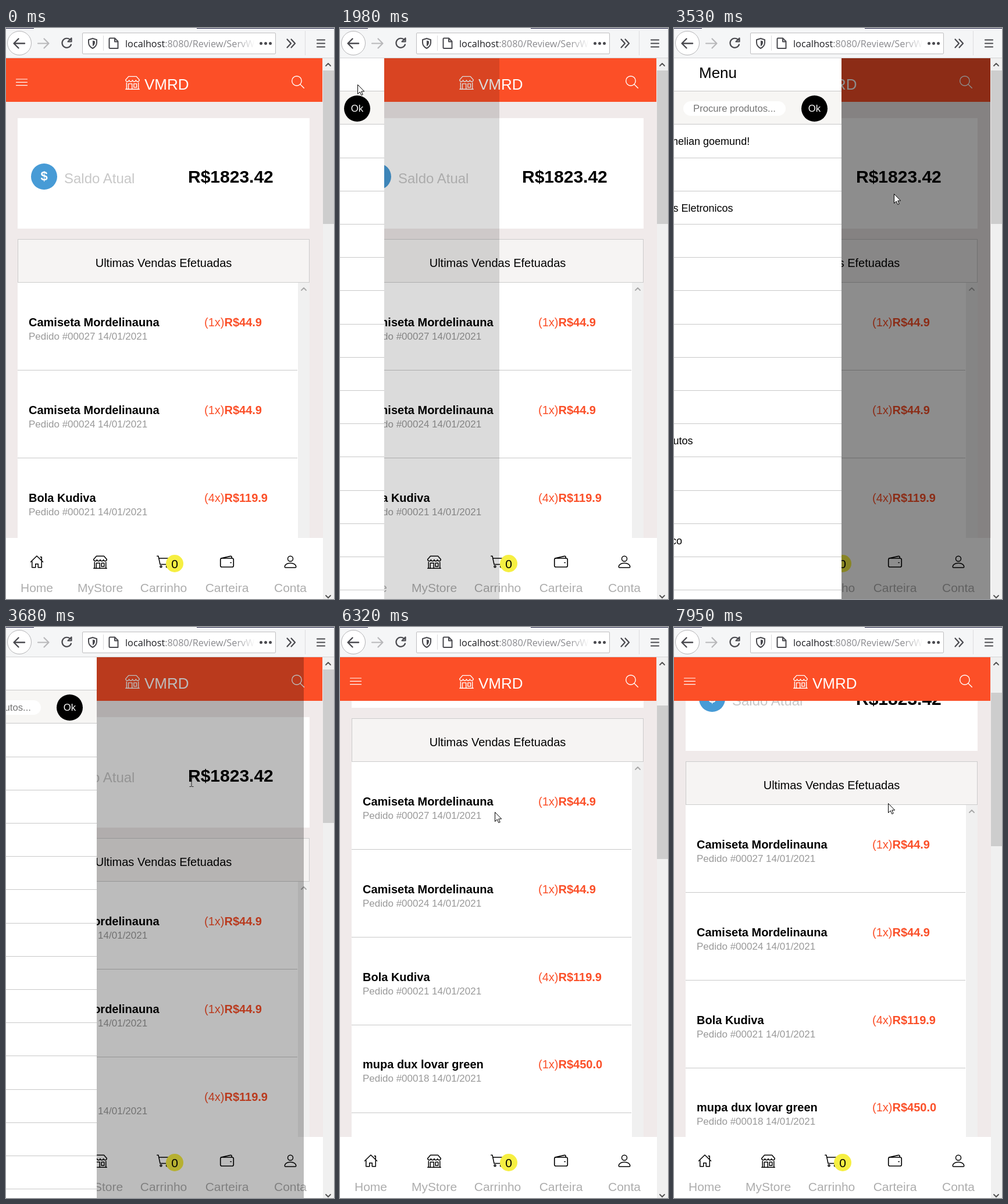
Animation, 564 px wide and 982 px high, one loop 8000 ms. Source, as an HTML page:

```html
<!DOCTYPE html>
<html lang="pt">
<head>
<meta charset="utf-8">
<style>
html, body { margin: 0; width: 100%; height: 100%; overflow: hidden; }
body { position: relative; font-family: "Liberation Sans", Arial, sans-serif; color: #000; }
div, svg { position: absolute; }
svg { overflow: visible; }
.t { white-space: pre; line-height: 30px; height: 30px; }
.line { fill: none; stroke: currentColor; stroke-linejoin: round; stroke-linecap: round; }
#stage { left: 0; top: 0; width: 564px; height: 982px; overflow: hidden; background: #fff; }
#view { left: 0; top: 52px; width: 545px; height: 930px; overflow: hidden; background: #f0eaea; }
#page, #bar, #nav, #shade, #menu { left: 0; top: -52px; }
#bar { top: 0; width: 544px; height: 75px; background: #fc4f27; color: #fff; }
#nav { top: 825px; width: 545px; height: 105px; background: #fff; }
#shade { top: 0; height: 930px; background: #000; }
#menu { top: 0; width: 413px; height: 930px; background: #fff; }
.box { left: 20px; width: 502px; background: #fff; }
.head { box-sizing: border-box; height: 75px; border: 1px solid #ccc; background: #f6f4f3; }
.rule { height: 1px; background: #c8c8c8; }
.sel { background: #0078d7; overflow: hidden; }
.dot { border-radius: 50%; }
#chrome { left: 0; top: 0; width: 564px; height: 52px; background: #f5f6f7; color: #4a4a4f; }
#url { left: 205px; top: 12px; width: 223px; height: 30px; overflow: hidden; font-family: "Open Sans", "Noto Sans", sans-serif;
  -webkit-mask-image: linear-gradient(90deg, #000 85%, transparent); mask-image: linear-gradient(90deg, #000 85%, transparent); }
#track { left: 545px; top: 52px; width: 19px; height: 930px; background: #f0f0f0; color: #505050; }
#thumb { left: 0; width: 19px; height: 264px; background: #cdcdcd; }
#press { width: 30px; height: 30px; background: rgba(246, 238, 50, .72); }
</style>
</head>
<body>
<div id="stage">
  <div id="view">
    <div id="page"></div>
    <div id="bar"></div>
    <div id="nav"></div>
    <div id="shade"></div>
    <div id="menu"></div>
  </div>
  <div id="track"><div id="thumb"></div></div>
  <div id="chrome"></div>
  <div id="press" class="dot"></div>
  <svg id="arrow" width="13" height="20"><path d="M.5.5v16l3.7-3.6 2.6 5.7 2.4-1.1-2.5-5.5h5z" fill="#fff" stroke="#000"/></svg>
  <svg id="beam" width="8" height="16"><path d="M.5.5h3M4.5.5h3M4 1v14M.5 15.5h3M4.5 15.5h3" fill="none" stroke="#222"/></svg>
</div>
<script>
const $ = id => document.getElementById(id);
const add = (id, ...html) => $(id).insertAdjacentHTML('beforeend', html.join(''));
const box = (x, y, w, h, style = '', cls = '', inner = '') =>
  `<div class="${cls}" style="left:${x}px;top:${y}px;width:${w}px;height:${h}px;${style}">${inner}</div>`;
// y is the middle of the capitals
const text = (x, y, size, str, style = '') =>
  `<div class="t" style="left:${x}px;top:${y - 15}px;font-size:${size}px;${style}">${str}</div>`;
const centred = (x, y, size, str, style = '') =>
  text(x - 150, y, size, str, `width:300px;text-align:center;${style}`);
const icon = (x, y, size, unit, body, cls = '', style = '') =>
  `<svg class="${cls}" viewBox="0 0 ${unit} ${unit}" style="left:${x}px;top:${y}px;width:${size}px;height:${size}px;${style}">${body}</svg>`;
const path = (d, attrs = '') => `<path d="${d}" ${attrs}/>`;
const circle = (x, y, r, attrs = '') => `<circle cx="${x}" cy="${y}" r="${r}" ${attrs}/>`;
const bold = 'font-weight:bold;';

const shop = path('M3.7 1.5h8.6l3.2 3.7v.4a1.9 1.9 0 0 1-3.75 0 1.9 1.9 0 0 1-3.75 0 1.9 1.9 0 0 1-3.75 0A1.9 1.9 0 0 1 .5 5.6v-.4zM1.5 8.5v7M14.5 8.5v7M.5 15.5h15M3.5 15V9.5h4V15M9.5 9.5h3v4h-3z');
const lens = circle(6.5, 6.5, 6) + path('M11 11l4.5 4.5');
const chevron = (x, y, up) => icon(x, y, 10, 10, path(up ? 'M1 7l4-4 4 4' : 'M1 3l4 4 4-4'), 'line', 'stroke-width:1.8;');

// Page
const header = (y, str) => box(20, y, 502, 75, '', 'head') + centred(271, y + 41, 20, str);
const sales = [
  ['Camiseta Mordelinauna', 27, 1, '44.9'], ['Camiseta Mordelinauna', 24, 1, '44.9'],
  ['Bola Kudiva', 21, 4, '119.9'], ['mupa dux lovar green', 18, 1, '450.0'], ['mupa dux lovar green', 17, 2, '450.0']
];
const saldo = (x, y, color) => text(x, y, 24, 'Saldo Atual', 'color:' + color);
const total = (x, y, color) => text(x, y, 30, 'R$1823.42', bold + 'color:' + color);
add('page',
  box(20, 155, 502, 190, 'background:#fff'),
  box(43, 233, 45, 45, 'background:#479bd6', 'dot'),
  centred(65.5, 255, 22, '$', bold + 'color:#fff'),
  saldo(100, 259, '#c8c8c8'), total(313, 256, '#000'),
  '<div id="marks">',
  `<div class="sel" id="selA" style="left:204px;top:245px;height:27px">${saldo(-104, 14, '#fff')}</div>`,
  '<div class="sel" id="selB" style="left:275px;top:249px;width:6px;height:22px"></div>',
  `<div class="sel" id="selC" style="left:313px;top:240px;height:33px">${total(0, 16, '#fff')}</div></div>`,
  header(363, 'Ultimas Vendas Efetuadas'),
  box(20, 438, 482, 759, 'background:#fff'),
  box(502, 438, 20, 759, 'background:#f0f0f0;color:#a8a8a8', '', chevron(5, 6, true) + chevron(5, 743)),
  ...sales.map(([name, id, n, price], i) => {
    const y = 506 + Math.round(i * 150.8);
    return text(39, y, 20, name, bold) +
      text(39, y + 25, 17, `Pedido #000${id} 14/01/2021`, 'color:#999') +
      text(341, y, 20, `(${n}x)<b>R$${price}</b>`, 'color:#fb4f28') +
      box(20, 588 + i * 151, 481, 1, '', 'rule');
  }),
  header(1215, 'Ultimas Compras Realizadas'));

add('bar',
  icon(17, 31, 20, 20, path('M.5 5h19M.5 10.3h19M.5 15.7h19'), 'line', 'stroke-width:1.2'),
  icon(205, 29, 25, 16, shop, 'line', 'stroke-width:.9'),
  text(238, 45, 26, 'VMRD'),
  icon(491, 30, 22, 16, lens, 'line'));

// Bottom navigation
const tabs = [
  ['Home', path('M2.5 7.5v7h4v-4h3v4h4v-7M1 8.2l7-6.9 7 6.9M12 2.5h1.5V6')],
  ['MyStore', shop],
  ['Carrinho', path('M.5 1.5H2l2 9.5h9l1.5-7h-12') + circle(5, 13.5, 1) + circle(12, 13.5, 1)],
  ['Carteira', path('M1 4L12 1.6q1.4-.2 1.4 1.1V4M2 4h12a1.5 1.5 0 0 1 1.5 1.5v7A1.5 1.5 0 0 1 14 14H2a1.5 1.5 0 0 1-1.5-1.5v-7A1.5 1.5 0 0 1 2 4zM12 9h.8', 'stroke-width="1.1"')],
  ['Conta', circle(8, 4.5, 3) + path('M1.5 13.8C1.5 11.5 4 9.5 8 9.5s6.5 2 6.5 4.3q0 .9-1 .9h-11q-1 0-1-.9z')]
];
add('nav', ...tabs.map(([label, art], i) =>
  icon(41 + i * 109, 29, 24, 16, art, 'line') +
  centred(53 + i * 109, 86, 21, label, 'color:#adadad')),
  box(275, 29, 30, 30, 'background:#f6ef42', 'dot'),
  centred(290, 44.5, 21, '0'));

// Side menu
const white = 'fill="#fff"';
const stroke = w => `fill="none" stroke="#000" stroke-width="${w}"`;
const items = [
  ['Pesquisa', 18, circle(7.2, 7.2, 5.6, stroke(3)) + path('M11.3 11.3l5.4 5.4', stroke(3.2))],
  ['Bem vindo helian goemund!', 18, circle(9, 9, 8.7) + circle(6, 7, 1.2, white) + circle(12, 7, 1.2, white) + path('M5 11.3q4 4 8 0', 'fill="none" stroke="#fff" stroke-width="1.3"')],
  ['Home', 20.3, path('M.8 9.2l9.3-7.6 9.3 7.6', stroke(1.8)) + path('M3.5 9.7l6.6-5.4 6.6 5.4V16.5h-4.6V12h-4v4.5H3.5zM14 2h2.4v5L14 5z')],
  ['Dispositivos Eletronicos', 22.5, path('M3.4 13V3.5q0-1 1-1h13.7q1 0 1 1V13', stroke(2.2)) + '<rect y="13.6" width="22.5" height="3" rx="1.4"/>'],
  ['Acessorios', 13.5, path('M3 0h2v5H3zM8.5 0h2v5h-2zM.5 5.5H13v2h-1a5.5 5.5 0 0 1-4.2 5.2V18H5.7v-5.3A5.5 5.5 0 0 1 1.5 7.5h-1z')],
  ['Infantil', 13.5, circle(6.75, 2.8, 2.7) + path('M1.2 4.5l3 3.3h5.1l3-3.3', stroke(2.2)) + path('M4 7.5h5.5v4.7H4z') + path('M4.6 12.5L3 14.5l2 2.4M8.9 12.5l1.6 2-2 2.4', stroke(2.2))],
  ['Fashion', 22.5, path('M8 1.2c1.5 1.6 5 1.6 6.5 0l3 .8 5 3.5-2.2 3.9-2.8-1.2v8.4H5V8.2L2.2 9.4 0 5.5 5 2z')],
  ['Esportes', 18, circle(9, 9, 8, stroke(1.7)) + circle(9, 9, 6.6, stroke(3) + ' stroke-dasharray="4.15"') + path('M9 5.5l3.4 2.5-1.3 4H6.9L5.6 8z')],
  ['Livros', 15.8, '<rect width="15.8" height="18" rx="2"/>' + path('M4.5 4.5h7v1.2h-7zM4.5 7.2h7v1.2h-7zM2.7 13.8H14v1.8H2.7z', white)],
  ['Meu Perfil', 15.8, circle(7.9, 4.6, 4.4) + path('M0 18v-3a4.7 4.7 0 0 1 4.7-4.7h6.4a4.7 4.7 0 0 1 4.7 4.7v3z')],
  ['Meus Produtos', 22.5, path('M3.5.5H19L22 7H.5zM2 8h2.5v5h9V8h2v9.5H2zM18 8h2.4v9.5H18z')],
  ['Carrinho', 20.3, path('M0 .7h4L4.5 3H20l-1.8 8H7.2l.4 1.6h10.5v1.8H6L3.2 2.6H0z') + circle(8, 16, 1.8) + circle(16, 16, 1.8)],
  ['Carteira', 18, path('M2.2 1h14v1.8H2.5v1H16a2 2 0 0 1 2 2V15a2 2 0 0 1-2 2H2.2A2.2 2.2 0 0 1 0 14.8v-12A2 2 0 0 1 2.2 1z') + circle(14, 10.3, 1.2, white)],
  ['Fale conosco', 18, path('M17.5 1l-4-1-2 4.5 2.3 2A13 13 0 0 1 7 13.5l-2-2.4L.3 13l1 4C10 17.5 17.8 10 17.5 1z')],
  ['Logout', 22.5, path('M2.5 2.5L11 .3v17.4H0v-2h2.5zM12.3 2.3h6v13.4h3.5v2h-6V4.5h-3.5z') + circle(9, 9, 1, white)]
];
const rowTop = i => Math.round(56.2 + i * 57.2);
add('menu',
  text(168, 25, 26, 'Menu'),
  box(0, 57, 413, 56, 'background:#f7f6f4'),
  ...items.map(([label, w, art], i) =>
    icon(9, rowTop(i) + 20, 18, 18, art) +
    text(9 + w + 5, rowTop(i) + 30, 18, label) +
    box(0, rowTop(i), 413, 1, '', 'rule')),
  box(0, rowTop(15), 413, 1, '', 'rule'),
  box(141, 74, 176, 25, 'background:#fff;border-radius:13px'),
  text(158, 86.5, 16.7, 'Procure produtos...', 'color:#757575'),
  box(344, 64, 45, 45, 'background:#000', 'dot'),
  centred(366.5, 86.5, 16.7, 'Ok', 'color:#fff'));

// Browser toolbar
const tool = (d, style) => icon(0, 0, 564, 564, path(d), 'line', style);
add('chrome',
  box(0, 0, 48, 1, 'background:#15153a'), box(328, 0, 236, 1, 'background:#15153a'),
  box(0, 51, 564, 1, 'background:#d4d4d6'),
  box(2, 5, 40, 40, 'border:1px solid #b4b4b6;background:#fff', 'dot'),
  box(131, 8, 331, 35, 'border:1px solid #bebec0;border-radius:2px;background:#fff'),
  box(167, 13, 1, 26, 'background:#dcdcde'), box(514, 5, 1, 42, 'background:#dcdcde'),
  tool('M32 26.500H14M21.500 18.500l-8 8 8 8', 'stroke-width:2.4'),
  tool('M55 26.500h18M65.500 18.500l8 8-8 8', 'stroke-width:2.2;color:#b8b8ba'),
  tool('M110.500 20.500a8 8 0 1 0 1.500 8M112.500 17.500v6h-6z', 'stroke-width:2.2'),
  tool('M149 18l7 2.300v4.700c0 5-3 8-7 10-4-2-7-5-7-10v-4.700z', 'stroke-width:2'),
  icon(0, 0, 564, 564, path('M149 21.500v10c2.500-1.500 4-3.500 4-6.500v-2.300z', 'fill="#4a4a4f"')),
  tool('M179 17.500h8l5.500 5.500v12H179q-1.500 0-1.500-1.500V19q0-1.500 1.500-1.500zM187 18v5.500h5', 'stroke-width:2'),
  ...[438, 446, 454].map(x => box(x - 2.5, 23.5, 5, 5, 'background:#4a4a4f', 'dot')),
  tool('M483.500 19.500l6.500 7-6.500 7M490.500 19.500l6.500 7-6.500 7', 'stroke-width:2.2'),
  tool('M535 20.500h13M535 26.500h13M535 32.500h13', 'stroke-width:2.2'),
  `<div id="url">${text(0, 15, 16.3, '<span style="color:#1c1c20">localhost</span>:8080/Review/ServWeb', 'color:#8a8a8e')}</div>`);
add('track', chevron(4, 6, true), chevron(4, 921));

// The screen refreshes in bursts: start, end, number of refreshes
const bursts = [
  [450, 1210, 11], [1300, 1380, 2], [1610, 2380, 11], [2450, 3220, 11], [3300, 3900, 9],
  [4220, 4910, 10], [5080, 5310, 4], [5460, 5540, 2], [5690, 6470, 11], [6550, 6930, 6],
  [7100, 7100, 1], [7250, 7560, 5], [7710, 7950, 4]
];
function refresh(t) {
  let last = 0;
  for (const [a, b, n] of bursts) {
    if (t < a) break;
    const gap = (b - a) / (n - 1) || 1;
    last = a + Math.min(n - 1, Math.floor((t - a + 16) / gap)) * gap;
  }
  return last;
}

// Pointer: time, x, y
const route = [
  [450, 548, 940], [750, 330, 590], [1000, 120, 230], [1210, 50, 109], [1300, 42, 107], [1380, 36, 105],
  [1610, 34, 101], [1760, 30, 97], [2380, 30, 97], [2527, 335, 254], [2760, 432, 311], [3220, 430, 304],
  [3400, 428, 300], [3675, 319, 267], [3900, 142, 260], [4220, 150, 260], [4373, 204, 256],
  [4680, 300, 232], [4910, 374, 244], [5310, 433, 258], [5460, 434, 260], [5540, 439, 263],
  [5690, 430, 266], [6100, 266, 318], [7040, 266, 318], [7100, 266, 319], [7634, 266, 319], [7950, 368, 303]
];
function pointer(t) {
  const i = route.findIndex(k => k[0] > t);
  if (i < 0) return route[route.length - 1].slice(1);
  const [a, b] = [route[Math.max(0, i - 1)], route[i]];
  const p = Math.max(0, (t - a[0]) / (b[0] - a[0]));
  return [a[1] + (b[1] - a[1]) * p, a[2] + (b[2] - a[2]) * p];
}

const part = (t, start, dur) => Math.min(1, Math.max(0, (t - start) / dur));
const out = p => 1 - (1 - p) ** 2;
const within = (t, a, b) => t >= a && t < b;
const show = (id, on) => { $(id).style.display = on ? 'block' : 'none'; };
const place = (id, x, y) => { $(id).style.transform = `translate(${x}px,${y}px)`; };
const edges = [313, 334.7, 351.4, 368, 384.7, 401.4, 418, 426.4, 443];

function draw(t) {
  const [x, y] = pointer(t).map(Math.round);

  const open = part(t, 1880, 500) - part(t, 3390, 500);
  place('menu', Math.round(413 * open ** 1.15) - 413, 0);
  show('menu', open > 0);
  $('shade').style.width = Math.min(544, Math.round(1190 * open)) + 'px';
  $('shade').style.opacity = .61 * open;

  const scroll = 132 * [5840, 6180, 6530].reduce((sum, s) => sum + out(part(t, s, 400)), 0) - 264 * out(part(t, 7190, 370));
  place('page', 0, -Math.round(scroll));
  $('thumb').style.top = 21 + Math.round(scroll * .303) + 'px';

  show('marks', within(t, 4370, 5690));
  const dragX = t < 5400 ? x : 433;
  $('selA').style.width = Math.min(19, Math.max(0, dragX - 204)) + 'px';
  show('selB', dragX > 278);
  const edge = edges.reduce((best, e) => Math.abs(e - dragX) < Math.abs(best - dragX) ? e : best);
  $('selC').style.width = edge - 313 + 'px';

  const beam = within(t, 3600, 5500);
  show('arrow', t >= 450 && !beam);
  show('beam', beam);
  show('press', within(t, 1600, 1760) || within(t, 3290, 3400) || within(t, 4370, 5450));
  place('arrow', x, y);
  place('beam', x - 4, y - 8);
  place('press', x - 17, y - 15);
}

const begin = performance.now();
function loop() {
  draw(refresh((performance.now() - begin) % 8000));
  requestAnimationFrame(loop);
}
loop();
</script>
</body>
</html>
```
